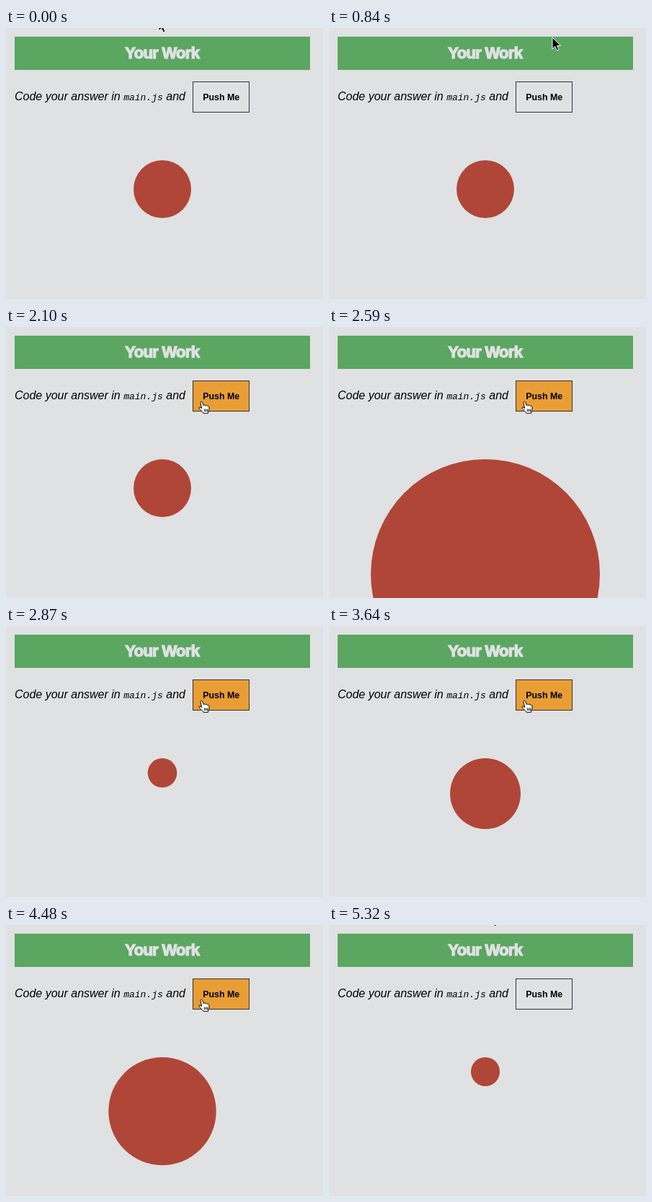
Write an HTML page that moves like this. It is 440 px wide and 375 px high and loops after 5.39 s.

```html
<!DOCTYPE html>
<html lang="en">
<head>
<meta charset="utf-8">
<title>Push Me</title>
<style>
  html, body { margin: 0; width: 100%; height: 100%; overflow: hidden; background: #dfe1e3; }
  svg { display: block; width: 440px; height: 375px; font-family: "Liberation Sans", Arial, sans-serif; }
  .title { font-size: 22px; font-weight: bold; letter-spacing: -.7px; fill: #dfe1e3; stroke: #dfe1e3; stroke-width: 1.4px; }
  .line { font-size: 16px; font-style: italic; }
  .code { font-size: 13px; font-family: "Liberation Mono", "Courier New", monospace; }
  .label { font-size: 12.4px; font-weight: bold; }
</style>
</head>
<body>
<svg viewBox="0 0 440 375">
  <rect x="12" y="12" width="410" height="46" fill="#5ba660"/>
  <text class="title" x="165.3" y="42">Your Work</text>
  <text class="line" x="12" y="100">Code your answer in <tspan class="code">main.js</tspan> and</text>
  <rect id="button" x="259.5" y="74.5" width="78" height="42" stroke="#333"/>
  <text class="label" x="273.2" y="100">Push Me</text>
  <circle id="ball" cx="217" fill="#b04638"/>
  <g id="cursor">
    <path id="arrow" d="M0 0V16L3.8 12.6 6.3 18 9 16.8 6.5 11.5H11.5Z" stroke="#fff"/>
    <g id="hand" transform="translate(-4 0)" stroke="#000" stroke-linejoin="round">
      <path fill="#fff" d="M3 3C2.4 1.2 5 .6 5.6 2.2L7.2 6.6C8 5.6 9.6 5.8 9.9 6.8 10.8 6 12.2 6.4 12.4 7.3 13.6 6.8 14.7 7.4 14.9 8.6 15.2 10.5 14.8 13 13.8 14.8L13.5 17.3H7C5.8 15 3.2 13.2 1.2 10.9.2 9.5 1.8 8.4 3 9.4L4.7 10.6Z"/>
      <path fill="none" d="M8.5 11.5v3.5M10.5 11.5v3.5M12.5 11.5v3.5"/>
    </g>
  </g>
</svg>
<script>
const LOOP = 5390, STEP = 70;
const [button, ball, cursor, arrow, hand] =
  ["button", "ball", "cursor", "arrow", "hand"].map(id => document.getElementById(id));

const clamp = u => Math.min(1, Math.max(0, u));
const smooth = u => u * u * (3 - 2 * u);
const mix = (a, b, u) => a.map((v, i) => v + (b[i] - v) * u);

// A change eases its values toward `to`, starting at `at`; times are in ms.
const change = (at, lasting, ...to) => ({ at, lasting, to });
const follow = (start, changes, t) => changes.reduce(
  (value, { at, lasting, to }) => mix(value, to, smooth(clamp((t - at) / lasting))), start);

const pointerMoves = [
  change(70, 350, 320, -10),
  change(560, 280, 310, 13),
  change(840, 280, 292, 34),
  change(1610, 350, 271, 102),
  change(4690, 560, 223.5, -16)
];
const resize = (at, size) => change(at, 75, size);
const ballSizes = [
  resize(2308, 160), resize(2520, 320), resize(2797, 40),
  resize(3357, 80), resize(3617, 160), resize(3847, 320), resize(4437, 40)
];
const hoverFades = [change(1780, 200, 1), change(4800, 200, 0)];
const PLAIN = [223, 225, 227], ORANGE = [233, 158, 53];

function draw(now) {
  const t = Math.floor((now % LOOP) / STEP) * STEP;

  const radius = follow([80], ballSizes, t)[0] / 2;
  ball.setAttribute("r", radius);
  ball.setAttribute("cy", 183 + radius);

  const [x, y] = follow([212, -12], pointerMoves, t);
  const over = y >= 74;
  cursor.setAttribute("transform", `translate(${x} ${y})`);
  arrow.style.display = over ? "none" : "";
  hand.style.display = over ? "" : "none";

  const [hover] = follow([0], hoverFades, t);
  button.setAttribute("fill", `rgb(${mix(PLAIN, ORANGE, hover).map(Math.round)})`);

  requestAnimationFrame(draw);
}
draw(0);
</script>
</body>
</html>
```
